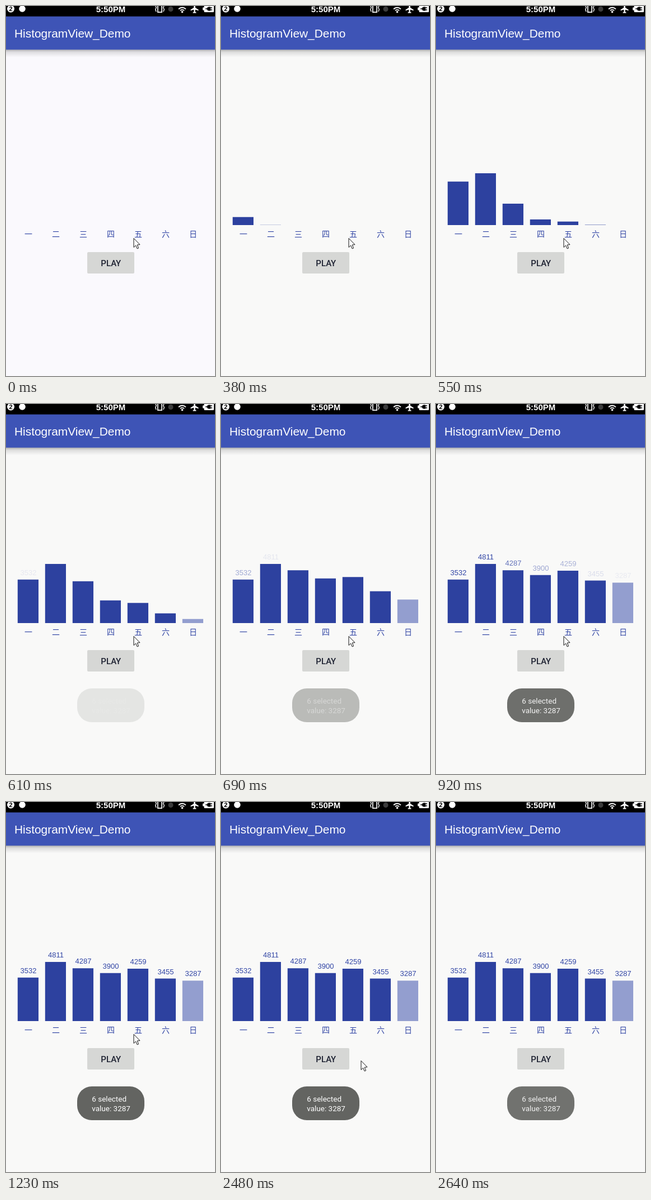
An HTML page with a canvas for the animation above (2720 ms loop, 373 by 657 pixels).

```html
<!DOCTYPE html>
<html lang="en">
<head>
<meta charset="utf-8">
<title>HistogramView_Demo</title>
<style>
  html, body { margin: 0; width: 100%; height: 100%; overflow: hidden; background: #f9f9f8; }
  canvas { display: block; }
</style>
</head>
<body>
<canvas id="stage" width="373" height="657"></canvas>
<script>
const ctx = document.getElementById('stage').getContext('2d');
const W = 373, H = 657, LOOP = 2720;

// The screen refreshes only at these moments.
const TICKS = [0, 380, 470, 550, 610, 690, 770, 850, 920, 1000, 1080, 1150, 1230, 2480, 2570, 2640];

const SANS = '"Liberation Sans", Arial, sans-serif';
const CJK = '"Noto Sans CJK SC", "Noto Sans CJK", sans-serif';
const ROBOTO = 'Roboto, sans-serif';

const BASE = 389, SCALE = 0.02185, GROW = 230, FADE = 300;
const BARS = [
  { day: '一', value: 3532, grow: 315, fade: 550 },
  { day: '二', value: 4811, grow: 373, fade: 628 },
  { day: '三', value: 4287, grow: 449, fade: 720 },
  { day: '四', value: 3900, grow: 499, fade: 779 },
  { day: '五', value: 4259, grow: 512, fade: 789 },
  { day: '六', value: 3455, grow: 537, fade: 844 },
  { day: '日', value: 3287, grow: 563, fade: 866 }
];
const SELECTED = 6;

const progress = (t, start, length) => Math.min(1, Math.max(0, (t - start) / length));
const easeInOut = p => (1 - Math.cos(Math.PI * p)) / 2;
const easeOut = p => 1 - (1 - p) ** 2;

function text(str, x, y, font, color, align = 'center') {
  ctx.font = font;
  ctx.fillStyle = color;
  ctx.textAlign = align;
  ctx.fillText(str, x, y);
}

function rect(x, y, w, h, color, r = 0) {
  ctx.fillStyle = color;
  ctx.beginPath();
  ctx.roundRect(x, y, w, h, r);
  ctx.fill();
}

function circle(x, y, r, color) {
  ctx.fillStyle = color;
  ctx.beginPath();
  ctx.arc(x, y, r, 0, Math.PI * 2);
  ctx.fill();
}

function polygon(x, y, points, fill, stroke) {
  ctx.beginPath();
  points.forEach(([px, py]) => ctx.lineTo(x + px, y + py));
  ctx.closePath();
  ctx.fillStyle = fill;
  ctx.fill();
  if (stroke) {
    ctx.strokeStyle = stroke;
    ctx.lineWidth = 1;
    ctx.stroke();
  }
}

function drawWifi(x, y) {
  ctx.strokeStyle = '#fff';
  ctx.lineWidth = 1.9;
  for (const r of [4.8, 8.8]) {
    ctx.beginPath();
    ctx.arc(x, y, r, -Math.PI * 0.76, -Math.PI * 0.24);
    ctx.stroke();
  }
  circle(x, y - 1, 1.8, '#fff');
}

function drawVibrate(x) {
  ctx.strokeStyle = '#fff';
  ctx.lineWidth = 1.7;
  ctx.strokeRect(x - 3.6, -1, 7.2, 12);
  ctx.lineWidth = 1.4;
  for (const side of [-1, 1]) {
    ctx.beginPath();
    ctx.moveTo(x + side * 7.4, 0);
    ctx.lineTo(x + side * 6.2, 3);
    ctx.lineTo(x + side * 7.8, 6);
    ctx.lineTo(x + side * 6.4, 10);
    ctx.stroke();
  }
}

function drawBattery() {
  rect(351, 2.5, 4, 5, '#fff', 1);
  rect(353.5, -2, 17.5, 13, '#fff', 1.5);
  rect(359, 1.5, 6, 7, '#000', [3, 0, 0, 3]);
  rect(364, 2.5, 4, 1.5, '#000');
  rect(364, 6, 4, 1.5, '#000');
  rect(356, 4.2, 4, 1.5, '#000');
}

function drawStatusBar() {
  rect(0, 0, W, 18.5, '#000');
  circle(8.5, 5, 6.5, '#fff');
  text('2', 8.5, 9, 'bold 11px ' + SANS, '#000');
  circle(29, 5, 5.8, '#fff');
  text('5:50PM', 187, 10.5, 'bold 15px ' + SANS, '#fff');
  drawVibrate(274.5);
  circle(294, 5.5, 4.5, '#3c3c3c');
  drawWifi(314.5, 11.5);
  polygon(336.5, 5, [[-1.2, -7], [1.2, -7], [1.4, -2], [7, 1.6], [7, 3.2], [1.4, 1.6],
    [1, 5], [3, 6.4], [3, 7.4], [-3, 7.4], [-3, 6.4], [-1, 5], [-1.4, 1.6],
    [-7, 3.2], [-7, 1.6], [-1.4, -2]], '#fff');
  drawBattery();
}

function drawAppBar() {
  const shade = ctx.createLinearGradient(0, 77, 0, 91);
  shade.addColorStop(0, 'rgba(0,0,0,.3)');
  shade.addColorStop(0.35, 'rgba(0,0,0,.11)');
  shade.addColorStop(1, 'rgba(0,0,0,0)');
  rect(0, 77, W, 14, shade);
  rect(0, 18, W, 59.4, '#3e54b6');
  text('HistogramView_Demo', 15, 56, '20.9px ' + SANS, '#fff', 'left');
}

function drawBar(bar, i, t) {
  const x = 21 + 49 * i, mid = x + 18.5;
  const full = bar.value * SCALE;
  const height = t < TICKS[1] ? 0 : full * easeInOut(progress(t, bar.grow, GROW));
  rect(x - 0.2, BASE - height, 37.2, height, i === SELECTED ? '#939ecf' : '#2d419f');
  text(bar.day, mid + 0.5, 410, '500 14px ' + CJK, '#3145a5');

  ctx.globalAlpha = easeInOut(progress(t, bar.fade, FADE));
  text(bar.value, mid + 0.5, Math.round(BASE - full - 8), '13px ' + SANS, '#3145a5');
  ctx.globalAlpha = 1;
}

function drawButton() {
  rect(145, 437, 84, 38, '#d6d7d5', 2);
  text('PLAY', 187.3, 462, '500 15px ' + ROBOTO, '#1c2030');
}

function drawToast(t) {
  ctx.globalAlpha = easeOut(progress(t, 576, 480)) * (1 - 0.1 * progress(t, 2500, 140));
  rect(127, 505, 120, 60, '#636461', 26);
  text('6 selected', 153.3, 532, '13.5px ' + ROBOTO, '#fff', 'left');
  text('value: 3287', 153.3, 549, '13.5px ' + ROBOTO, '#fff', 'left');
  ctx.globalAlpha = 1;
}

function drawCursor(t) {
  if (t >= 2640) return;
  const [x, y] = t >= 2570 ? [330, 641] : t >= 2480 ? [249, 459] : [227, 412];
  polygon(x + 1, y + 0.5, [[0, 0], [0, 16], [3.6, 12.6], [6.2, 18.4], [8.6, 17.4],
    [6.2, 11.6], [11, 11.2]], '#fff', '#111');
}

function draw(t) {
  rect(0, 0, W, H, t < TICKS[1] ? '#faf9fd' : '#f9f9f8');
  drawAppBar();
  drawStatusBar();
  BARS.forEach((bar, i) => drawBar(bar, i, t));
  drawButton();
  drawToast(t);
  drawCursor(t);
}

const start = performance.now();
function loop() {
  const t = (performance.now() - start) % LOOP;
  draw(TICKS.findLast(tick => tick <= t));
  requestAnimationFrame(loop);
}
loop();
</script>
</body>
</html>
```
